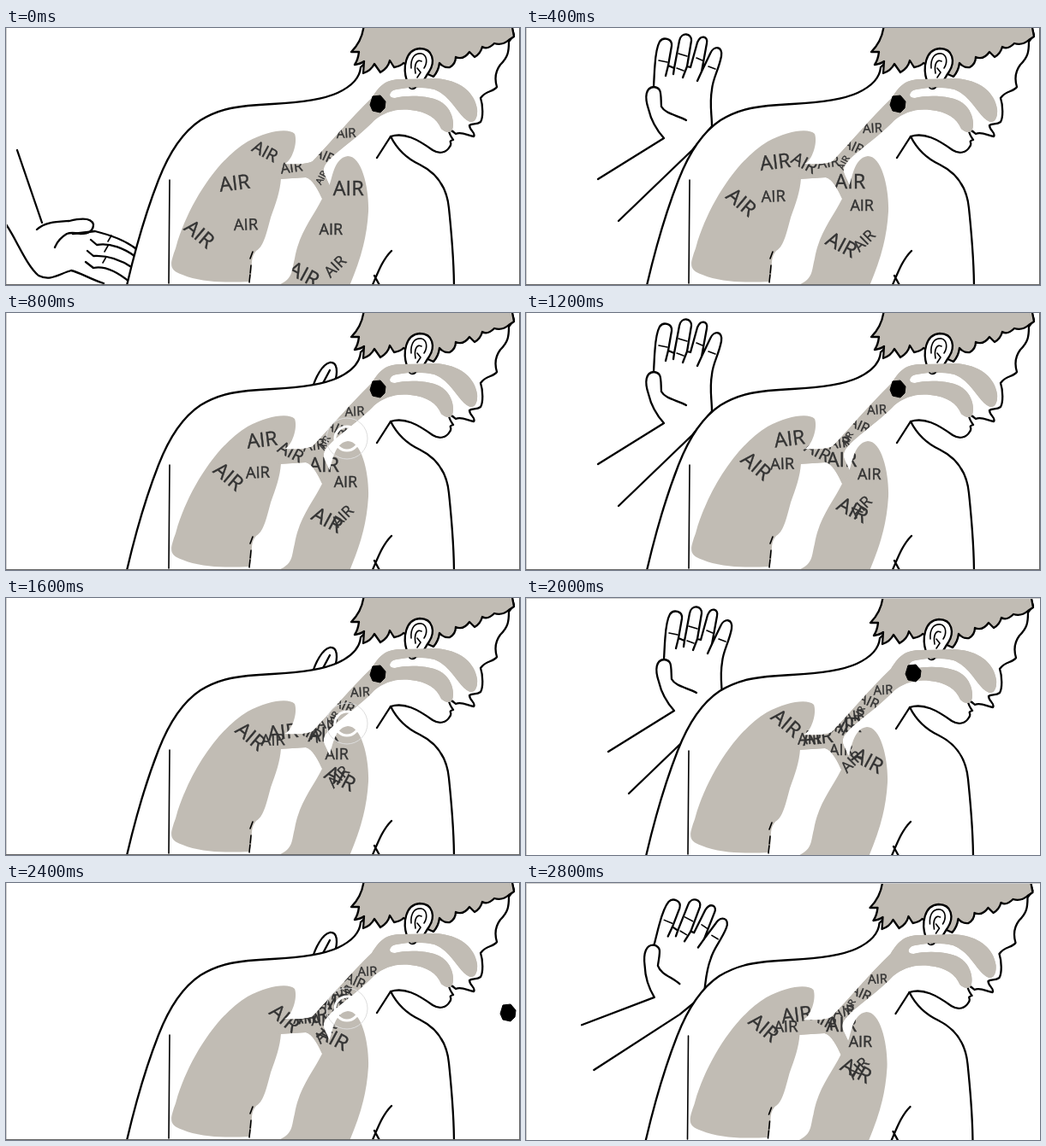
Recreate the animation shown at these times as an HTML page. Size 600 px wide and 301 px high, loop 3200 ms.

```html
<!DOCTYPE html>
<html lang="en">
<head>
<meta charset="utf-8">
<title>Back blows</title>
<style>
  html, body { margin: 0; width: 100%; height: 100%; overflow: hidden; background: #fff; }
  svg { display: block; width: 100%; height: 100%; }
  .ink { fill: none; stroke: #000; stroke-width: 2.3; stroke-linecap: round; stroke-linejoin: round; }
  .fine { stroke-width: 1.6; }
  .skin { fill: #fff; }
  .grey { fill: #c1bcb4; }
  text { font-family: "Open Sans", "Noto Sans", sans-serif; fill: #333; stroke: #333; stroke-width: .4; text-anchor: middle; }
</style>
</head>
<body>
<svg viewBox="0 0 600 301">
  <defs>
    <path id="leftLung" d="M337 124C330 117 306 120 282 133C245 155 211 210 198 258C191 277 190 284 206 289C230 299 262 298 284 297C290 284 283 271 292 261C301 256 304 240 309 222C315 205 320 192 321 176L325 159C333 157 341 135 337 124Z"/>
    <path id="rightLung" d="M399 150C416 150 424 190 423 215C421 250 412 275 401 302H316C336 294 333 285 337 270C342 240 358 222 369 200L376 188C381 178 382 152 399 150Z"/>
    <path id="airway" d="M358 156C378 135 402 106 427 82C437 66 444 60 462 60L500 59C528 60 547 74 550 95C551 108 545 113 538 108C527 101 520 80 500 72C484 68 462 70 452 73C446 77 447 82 454 82C470 78 500 79 511 89C520 96 524 110 521 119C518 124 512 122 508 118C503 106 492 98 472 96C455 94 441 99 430 108C420 119 402 133 385 147C374 157 368 163 372 172L379 187L370 202C364 189 358 177 350 175L318 177L322 159C335 160 350 160 358 156Z"/>
    <clipPath id="inside">
      <use href="#leftLung"/><use href="#rightLung"/><use href="#airway"/>
    </clipPath>
    <!-- Routes the air takes out of the lungs -->
    <path id="leftLane" d="M226 241L267 181L303 144L335 164L373 149L398 122L447 84"/>
    <path id="leftSide" d="M280 230L289 196L304 167L335 163L373 149L440 90"/>
    <path id="rightLane" d="M348 288L379 236L401 188L368 176L372 150L440 88"/>
    <path id="rightSide" d="M384 279L396 257L386 200L370 170L440 90"/>
  </defs>

  <g id="lowHand" class="ink">
    <path d="M13 143L42 228"/>
    <path d="M0 230C12 247 23 277 38 290C52 297 62 288 76 284C86 286 98 294 114 299"/>
    <path d="M36 236C46 227 58 227 74 226C90 222 100 223 102 230C102 237 98 241 87 241C81 240 76 239 71 241Q61 247 57 257"/>
    <path d="M78 241L104 238C120 242 138 248 151 258M99 248L106 254C122 251 139 259 150 267M95 261L102 267C119 266 135 272 148 281M93 274L102 281C116 278 133 288 145 298"/>
    <path class="fine" d="M123 243L119 250M119 255L115 262M117 268L113 275"/>
  </g>
  <g id="raisedHand" class="ink">
    <path class="skin" d="M84 177L161 129C152 119 146 108 143 95C138 80 140 70 149 69L150 50C151 38 151 25 156 16C160 10 171 12 170 21L166 44L173 47L179 15C181 4 194 6 193 15L188 45L192 46L200 17C204 7 213 10 211 18L205 51L215 30C219 20 230 21 228 33C225 49 218 59 217 72C214 89 217 101 217 115L194 143L108 226"/>
    <path d="M149 69C159 70 157 77 158 92C163 101 177 102 187 108M166 44L163 56M173 47L172 54M188 45L183 58M205 51L200 62"/>
    <path class="fine" d="M155 38L165 40M178 30L188 33M176 47L184 50M199 35L206 38M213 45L221 48"/>
  </g>
  <g id="strikeHand" class="ink">
    <path class="skin" d="M357 90C361 76 369 60 378 58C387 57 388 69 383 84"/>
    <path d="M369 84L378 67"/>
  </g>

  <g id="person">
    <path class="ink skin" d="M140 306C150 262 164 214 178 178C190 147 206 122 227 108C250 94 270 91 311 89C349 87 372 83 387 76C402 69 413 59 414 46L432 28L440 -8H588L593 8L587 16C587 28 586 34 577 43C571 51 570 59 573 69C569 75 560 73 554 82C557 91 557 105 554 110C549 114 545 111 541 114C541 120 549 123 546 127C539 126 532 121 525 124C514 114 516 122 522 131C515 133 522 134 518 139C514 146 506 148 498 143C480 130 465 122 449 127C456 141 468 153 483 160C505 171 515 190 517 211C520 240 523 270 523 306Z"/>
    <path class="ink" d="M449 127L433 152M450 261C439 272 434 287 427 303M430 290L437 303"/>
    <path class="ink fine" d="M191 178L190 299"/>
    <g class="grey">
      <use href="#leftLung"/><use href="#rightLung"/><use href="#airway"/>
    </g>
    <path class="ink fine" d="M288 262L285 270M286 278L284 298" stroke-dasharray="9 2"/>
    <path class="ink grey" d="M418 -6C417 10 411 20 403 28L412 28Q411 37 407 43Q414 42 418 39L417 53Q426 50 430 42L437 52Q446 47 448 38L453 46Q460 45 464 41L470 44L499 57Q505 50 506 41Q511 47 518 46Q525 42 525 34Q534 38 541 28L547 34Q554 30 556 22Q562 26 570 18Q579 21 587 14L593 10L590 -6Z"/>
    <path class="ink skin" d="M468 62C463 47 466 25 483 24C499 24 501 40 494 51C490 56 488 63 483 66C477 72 470 70 468 62Z"/>
    <use href="#airway" class="grey"/>
    <path class="ink fine" d="M473 47C472 34 478 29 485 30C492 32 492 41 488 47M478 53C476 42 480 36 485 39M480 47L484 52L480 58M471 70Q474 73 478 70"/>
    <g id="words" clip-path="url(#inside)"></g>
  </g>
  <g id="impact" fill="none">
    <circle cx="398" cy="147" r="14" stroke="#fff" stroke-width="3"/>
    <circle cx="398" cy="147" r="24" stroke="#ddd"/>
  </g>
  <path id="bolus" d="M-6 -9L3 -10L9 -3L8 5L3 10L-6 8L-9 1Z" stroke="#000" stroke-linejoin="round"/>
  <path d="M.5 0V301" stroke="#ccc"/>
  <path id="topEdge" d="M0 .5H600" stroke="#ccc"/>
  <path id="lowEdge" d="M0 300.5H600M599.5 0V301" stroke="#666"/>
</svg>
<script>
const byId = id => document.getElementById(id);

// "at" is the resting place along the lane, from 0 (deep in the lung) to 1 (throat).
const words = [
  { lane: "leftLane", at: 0, tilt: 40, size: 24 },
  { lane: "leftLane", at: .24, tilt: -7, size: 23.5 },
  { lane: "leftLane", at: .41, tilt: 28, size: 20 },
  { lane: "leftLane", at: .53, tilt: -8, size: 17 },
  { lane: "leftLane", at: .67, tilt: 24, size: 16 },
  { lane: "leftLane", at: .79, tilt: -3, size: 15 },
  { lane: "leftSide", at: 0, tilt: -2, size: 18.5 },
  { lane: "rightLane", at: 0, tilt: 28, size: 24 },
  { lane: "rightLane", at: .23, tilt: 0, size: 18 },
  { lane: "rightLane", at: .43, tilt: 0, size: 23.5 },
  { lane: "rightLane", at: .56, tilt: -63, size: 11 },
  { lane: "rightSide", at: 0, tilt: -45, size: 18 }
];

// "push" is the share of the remaining way to the throat the air has been driven.
const throat = [434, 89];
const scenes = [
  { hand: "lowHand", push: 0, bolus: throat },
  { hand: "raisedHand", push: .15, bolus: throat },
  { hand: "strikeHand", push: .2, bolus: throat },
  { hand: "raisedHand", push: .25, bolus: throat },
  { hand: "strikeHand", push: .33, bolus: throat },
  { hand: "raisedHand", push: .42, bolus: [452, 88], move: "translate(12 3)", shift: -1 },
  { hand: "strikeHand", push: .5, bolus: [586, 152] },
  { hand: "raisedHand", push: .3, shift: -1.5,
    move: "translate(174 109) rotate(11) translate(-180 -100)" }
];

const show = (id, visible) => byId(id).setAttribute("display", visible ? "inline" : "none");

function wordMarkup({ lane, at, tilt, size }, push) {
  const path = byId(lane);
  const { x, y } = path.getPointAtLength(path.getTotalLength() * (at + push * (1 - at)));
  return `<text transform="translate(${x} ${y}) rotate(${tilt})" y="${size * .357}" font-size="${size}">AIR</text>`;
}

function draw({ hand, push, bolus, move = "", shift = 0 }) {
  for (const id of ["lowHand", "raisedHand", "strikeHand"]) show(id, id === hand);
  byId("raisedHand").setAttribute("transform", move);
  byId("person").setAttribute("transform", `translate(${shift} ${shift ? 1 : 0})`);
  byId("words").innerHTML = words.map(word => wordMarkup(word, push)).join("");
  show("impact", hand === "strikeHand");
  show("bolus", bolus);
  if (bolus) byId("bolus").setAttribute("transform", `translate(${bolus})`);
  show("topEdge", shift);
  show("lowEdge", !shift);
}

let current = -1;
function tick() {
  const index = Math.floor(performance.now() % 3200 / 400);
  if (index !== current) draw(scenes[current = index]);
  requestAnimationFrame(tick);
}
tick();
</script>
</body>
</html>
```
